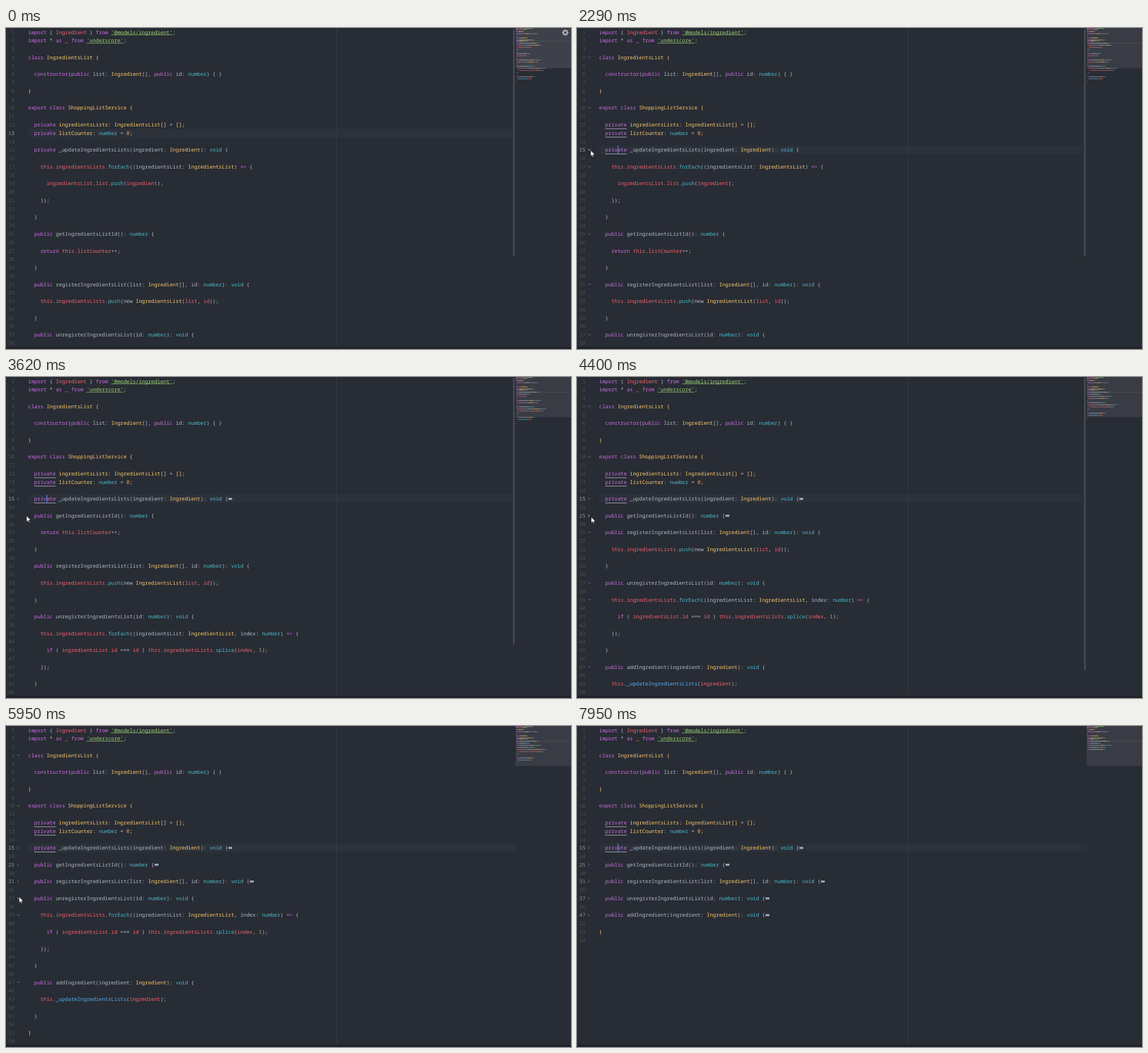
Animation, 992 px wide and 564 px high, one loop 8 s. Source, as an HTML page with a canvas:

```html
<!DOCTYPE html>
<html lang="en">
<head>
<meta charset="utf-8">
<title>Code folding</title>
<style>
  html, body { margin: 0; width: 100%; height: 100%; overflow: hidden; background: #282c34; }
  canvas { display: block; }
</style>
</head>
<body>
<canvas id="stage" width="992" height="564"></canvas>
<script>
const ctx = document.getElementById('stage').getContext('2d');
const W = 992, H = 564, LOOP = 8000;
const ROW = 14.766, CELL = 5.4, LEFT = 38.8;
const MAP_X = 895, MAP_ROW = 1.845, MAP_CELL = 0.617;

const COLORS = {
  p: '#d06fe8', r: '#fa626e', y: '#ffcb6b', g: '#9fd574',
  c: '#4bbdd0', b: '#55b5f8', o: '#e5a05f', t: '#b4bbc8'
};

// Segments are split by "|"; the first letter of each is its colour.
const SOURCE = [
  "pimport|t { |rIngredient|t } |pfrom |g'@models/ingredient'|t;",
  "pimport|t * |pas |r_ |pfrom |g'underscore'|t;",
  "",
  "pclass |yIngredientsList {",
  "",
  "t  |pconstructor|t(|ppublic|t list: |yIngredient|t[], |ppublic|t id: |cnumber|t) { }",
  "",
  "y}",
  "",
  "pexport class |yShoppingListService {",
  "",
  "t  |pprivate |yingredientsLists: IngredientsList[]|t = |y[];",
  "t  |pprivate |ylistCounter|t: |cnumber|t = |o0|y;",
  "",
  "t  |pprivate|t _updateIngredientsLists(ingredient: |yIngredient|t): |cvoid|t {",
  "",
  "t    |rthis|t.|ringredientsLists|t.|cforEach|t((ingredientsList: |yIngredientsList|t) |p=>|t {",
  "",
  "t      |ringredientsList|t.|rlist|t.|cpush|t(|ringredient|t);",
  "",
  "t    });",
  "",
  "t  }",
  "",
  "t  |ppublic|t getIngredientsListId(): |cnumber|t {",
  "",
  "t    |preturn |rthis|t.|rlistCounter|t++;",
  "",
  "t  }",
  "",
  "t  |ppublic|t registerIngredientsList(list: |yIngredient|t[], id: |cnumber|t): |cvoid|t {",
  "",
  "t    |rthis|t.|ringredientsLists|t.|cpush|t(new |yIngredientsList|t(|rlist|t, |rid|t));",
  "",
  "t  }",
  "",
  "t  |ppublic|t unregisterIngredientsList(id: |cnumber|t): |cvoid|t {",
  "",
  "t    |rthis|t.|ringredientsLists|t.|cforEach|t((ingredientsList: |yIngredientsList|t, index: |cnumber|t) |p=>|t {",
  "",
  "t      |pif|t ( |ringredientsList|t.|rid|t === |rid|t ) |rthis|t.|ringredientsLists|t.|csplice|t(|rindex|t, |o1|t);",
  "",
  "t    });",
  "",
  "t  }",
  "",
  "t  |ppublic|t addIngredient(ingredient: |yIngredient|t): |cvoid|t {",
  "",
  "t    |rthis|t.|b_updateIngredientsLists|t(|ringredient|t);",
  "",
  "t  }",
  "",
  "y}",
  ""
];

const lines = SOURCE.map((text, i) => {
  let col = 0;
  const tokens = !text ? [] : text.split('|').map(part => {
    const token = { color: part[0], text: part.slice(1), col };
    col += token.text.length;
    return token;
  });
  return { number: i + 1, tokens, length: col };
});

const FOLDABLE = [4, 10, 15, 17, 25, 31, 37, 39, 47];
const FOLDS = [
  { start: 15, end: 23, at: 2730 },
  { start: 25, end: 29, at: 4390 },
  { start: 31, end: 35, at: 5060 },
  { start: 37, end: 45, at: 6170 },
  { start: 47, end: 51, at: 7390 }
];
const CLICK = 1180, MARK = 1290;

// Pointer stops: time, x, y
const PATH = [
  [1720, 36, 218], [1840, 25, 216], [2290, 24, 215], [3280, 24, 215],
  [3400, 26, 224], [3620, 36, 244], [3740, 36, 244], [3860, 27, 245],
  [4180, 25, 246], [4500, 25, 246], [4730, 24, 254], [4950, 23, 271],
  [5390, 23, 272], [5610, 23, 280], [5840, 23, 300], [6280, 23, 301],
  [6510, 24, 309], [6610, 24, 311], [6830, 24, 321], [7050, 24, 324],
  [7280, 23, 330], [7830, 24, 331], [7940, 32, 330]
];

function pointerAt(t) {
  const next = PATH.findIndex(stop => stop[0] > t);
  if (next < 1) return null;
  const [t0, x0, y0] = PATH[next - 1], [t1, x1, y1] = PATH[next];
  const k = (t - t0) / (t1 - t0);
  return { x: x0 + (x1 - x0) * k, y: y0 + (y1 - y0) * k };
}

function rect(x, y, w, h, color) {
  ctx.fillStyle = color;
  ctx.fillRect(x, y, w, h);
}

function polyline(points, color, width) {
  ctx.beginPath();
  points.forEach(([x, y]) => ctx.lineTo(x, y));
  ctx.strokeStyle = color;
  ctx.lineWidth = width;
  ctx.stroke();
}

function drawChevron(y, folded, bright) {
  const points = folded
    ? [[19.6, y - 2.2], [21.9, y], [19.6, y + 2.2]]
    : [[19.6, y - 1.2], [21.8, y + 1], [24, y - 1.2]];
  polyline(points, bright ? '#c3c8d2' : '#737a87', 1);
}

function drawLine(line, row, folded, active) {
  const top = row * ROW, base = top + 10.6;
  ctx.textAlign = 'right';
  ctx.fillStyle = active ? '#a0a7b5' : folded ? '#8d94a2' : '#4a5161';
  ctx.fillText(line.number, 14.9, base);
  ctx.textAlign = 'left';
  for (const { color, text, col } of line.tokens) {
    const x = LEFT + col * CELL;
    ctx.fillStyle = COLORS[color];
    ctx.fillText(text, x, base);
    if (color === 'g') rect(x, base + 1, text.length * CELL, 0.8, COLORS.g);
  }
  if (folded) {
    const x = LEFT + line.length * CELL;
    rect(x + 0.7, top + 5.8, 6.6, 3.4, '#b4bbc8');
    rect(x + 2, top + 7.2, 4, 0.6, '#626874');
  }
}

function drawMinimap(visible, activeRow, hovered) {
  rect(MAP_X, 0, W - MAP_X, 70.6, hovered ? '#3e4149' : '#393c44');
  rect(MAP_X, activeRow * MAP_ROW, W - MAP_X, MAP_ROW, 'rgba(255,255,255,.06)');
  ctx.globalAlpha = 0.65;
  visible.forEach((line, row) => {
    for (const { color, text, col } of line.tokens) {
      for (const word of text.matchAll(/\S+/g)) {
        rect(MAP_X + (col + word.index) * MAP_CELL, row * MAP_ROW + 0.2,
          word[0].length * MAP_CELL, 1.2, COLORS[color]);
      }
    }
  });
  ctx.globalAlpha = 1;
}

function drawGear(x, y) {
  ctx.save();
  ctx.translate(x, y);
  ctx.strokeStyle = '#b5b9c1';
  ctx.lineWidth = 2;
  ctx.beginPath();
  ctx.arc(0, 0, 3.2, 0, Math.PI * 2);
  ctx.stroke();
  for (let i = 0; i < 8; i++) {
    rect(-1, -5.5, 2, 2, '#b5b9c1');
    ctx.rotate(Math.PI / 4);
  }
  ctx.restore();
}

function drawPointer({ x, y }) {
  const shape = [[0, 0], [0, 10.4], [2.4, 8.2], [4, 11.8], [5.6, 11.1], [4.1, 7.6], [7.4, 7.4]];
  ctx.beginPath();
  shape.forEach(([dx, dy]) => ctx.lineTo(x + dx, y + dy));
  ctx.closePath();
  ctx.fillStyle = '#fff';
  ctx.fill();
  ctx.strokeStyle = '#15171b';
  ctx.lineWidth = 0.7;
  ctx.stroke();
}

function draw(t) {
  const folds = FOLDS.filter(fold => t >= fold.at);
  const isFolded = n => folds.some(fold => fold.start === n);
  const visible = lines.filter(({ number: n }) => !folds.some(f => n > f.start && n <= f.end));
  const activeLine = t < CLICK ? 13 : 15;
  const activeRow = activeLine - 1;
  const pointer = pointerAt(t);
  const inGutter = pointer && pointer.x < 30;
  const contentHeight = visible.length * ROW;
  const scrolls = contentHeight > H;

  rect(0, 0, W, H, '#282c34');
  rect(LEFT, activeRow * ROW, (scrolls ? 889 : MAP_X) - LEFT, ROW, '#2c313a');
  rect(580, 0, 1, 560, '#373c46');

  ctx.font = '9px "Noto Sans Mono", monospace';
  ctx.textRendering = 'geometricPrecision';
  visible.forEach((line, row) => {
    const n = line.number, folded = isFolded(n), mid = (row + 0.5) * ROW;
    if (mid > 560) return;
    drawLine(line, row, folded, n === activeLine);
    if (folded || (inGutter && FOLDABLE.includes(n))) {
      const over = inGutter && Math.floor(pointer.y / ROW) === row;
      drawChevron(mid, folded, over);
    }
  });

  if (t >= MARK) {
    for (const n of [12, 13, 15]) rect(LEFT + 2 * CELL, n * ROW - 0.7, 7 * CELL, 1, '#b5a9c4');
  }
  const blinkOn = (t + 390) % 800 < 400;
  if (t >= CLICK && blinkOn) rect(71.2, activeRow * ROW, 1.3, ROW, '#528bff');

  if (scrolls) rect(890.3, 2, 2.7, H * H / contentHeight, '#474c57');
  const hovered = t < 100;
  drawMinimap(visible, activeRow, hovered);
  if (hovered) drawGear(982, 8);
  rect(0, 560.3, W, 3.7, '#22222c');
  if (pointer) drawPointer(pointer);
}

const start = performance.now();
function tick() {
  draw((performance.now() - start) % LOOP);
  requestAnimationFrame(tick);
}
tick();
</script>
</body>
</html>
```
